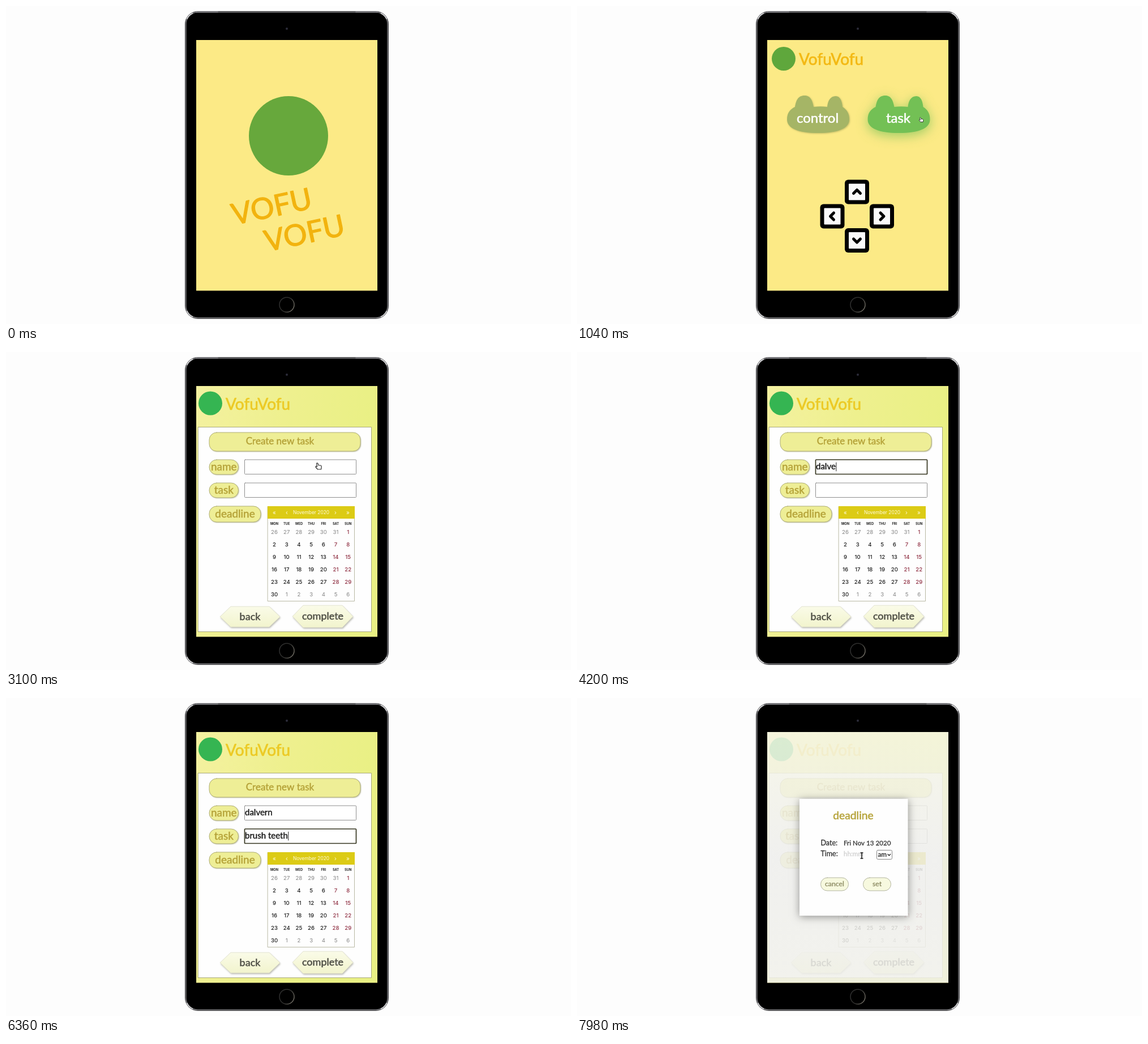
These frames come from a looping animation (998x561 px, 8 s). An HTML page with a canvas:

```html
<!DOCTYPE html>
<html lang="en">
<head>
<meta charset="utf-8">
<title>Task app on a tablet</title>
<style>
  html, body { margin: 0; width: 100%; height: 100%; overflow: hidden; background: #fdfdfd; }
  canvas { display: block; }
</style>
</head>
<body>
<canvas id="stage" width="998" height="561"></canvas>
<script>
const ctx = document.getElementById('stage').getContext('2d');
const LOOP = 8000;
const HAND = 'Lato, sans-serif';
const PLAIN = 'Inter, sans-serif';
const BRAND = 'Vofu';
const NAME = 'dalvern';
const TASK = 'brush teeth';

// Screen changes, in ms
const MAIN = 300, TASKS = 1660, FORM = 2560, DIALOG = 7440;
// Field focus and typing, in ms
const FOCUS_NAME = 3320, TYPE_NAME = 3480, FOCUS_TASK = 4940, TYPE_TASK = 5260, BLUR = 6640;

// Pointer path: time, x, y
const PATH = [
  [300, 512, 300], [460, 512, 300], [920, 608, 201], [1700, 608, 201],
  [2040, 446, 272], [2600, 446, 272], [3000, 552, 202], [4680, 552, 202],
  [4880, 540, 243], [6480, 540, 243], [6960, 562, 364], [7120, 562, 364],
  [7240, 582, 366], [7380, 562, 364], [7480, 562, 364], [7820, 503, 278]
];

const FROG_BUTTON = new Path2D(
  'M0 42C0 30 6 24 14 20C16 9 19 0 31 0C42 0 45 10 47 20C55 19 63 19 71 20' +
  'C72 10 76 1 86 1C94 1 97 10 98 20C106 25 110 32 110 42C110 58 90 66 55 66C20 66 0 58 0 42Z');
const POINTER = new Path2D(
  'M-3.5 -5.5Q-2.5 -7 -1.2 -5.5L0 -2.2L3.6 -2Q5.4 -1.6 5.2 0.6L4.6 5H-1.6L-5 1Q-5.4 -0.8 -3.6 -0.4L-2.4 0.2Z');

function text(str, x, y, size, color, { align = 'left', font = HAND, weight = 400 } = {}) {
  ctx.font = `${weight} ${size}px ${font}`;
  ctx.textAlign = align;
  ctx.fillStyle = color;
  ctx.fillText(str, x, y);
  if (font !== HAND) return;
  // A thin round outline gives the look of a felt pen
  ctx.lineJoin = 'round';
  ctx.lineWidth = size * 0.025;
  ctx.strokeStyle = color;
  ctx.strokeText(str, x, y);
}

const center = (str, x, y, size, color, opts) => text(str, x, y, size, color, { align: 'center', ...opts });

function paint(fill, stroke, width = 1) {
  if (fill) { ctx.fillStyle = fill; ctx.fill(); }
  if (stroke) { ctx.strokeStyle = stroke; ctx.lineWidth = width; ctx.stroke(); }
}

function box(x, y, w, h, r, fill, stroke, width) {
  ctx.beginPath();
  ctx.roundRect(x, y, w, h, r);
  paint(fill, stroke, width);
}

function disc(x, y, r, fill, stroke, width) {
  ctx.beginPath();
  ctx.arc(x, y, r, 0, Math.PI * 2);
  paint(fill, stroke, width);
}

function line(points, color, width) {
  ctx.beginPath();
  points.forEach(([x, y]) => ctx.lineTo(x, y));
  ctx.lineCap = ctx.lineJoin = 'round';
  paint(null, color, width);
}

function shadowed(color, blur, dx, dy, draw) {
  ctx.save();
  ctx.shadowColor = color;
  ctx.shadowBlur = blur;
  ctx.shadowOffsetX = dx;
  ctx.shadowOffsetY = dy;
  draw();
  ctx.restore();
}

function gradient(x0, y0, x1, y1, ...colors) {
  const g = ctx.createLinearGradient(x0, y0, x1, y1);
  colors.forEach((c, i) => g.addColorStop(i / (colors.length - 1), c));
  return g;
}

const vertical = (y0, y1, ...colors) => gradient(0, y0, 0, y1, ...colors);

function tablet() {
  box(316, 9, 360, 543, 23, '#3e3e40');
  box(317.8, 10.8, 356.4, 539.4, 21, '#0a0a0a', '#8e8e92', 1.2);
  box(320, 12.5, 352, 536, 19, '#000');
  // Light caught by the metal at the four corners
  [[338, 31, 1], [654, 31, 1.5], [654, 530, 0], [338, 530, 0.5]].forEach(([x, y, turn]) => {
    ctx.beginPath();
    ctx.arc(x, y, 20, (turn + 0.14) * Math.PI, (turn + 0.36) * Math.PI);
    paint(null, '#d6d6d8', 1.8);
  });
  line([[336, 10.5], [374, 10.5]], '#85858a', 2);
  line([[618, 10.5], [656, 10.5]], '#85858a', 2);
  disc(496, 40, 2, '#2c2c3a');
  disc(496, 527, 13, null, gradient(483, 520, 509, 534, '#303030', '#2e2e2c', '#77736a'), 1.5);
}

function splash() {
  disc(499, 229, 70, '#67a83c');
  [[469, 353], [527, 400]].forEach(([x, y]) => {
    ctx.save();
    ctx.translate(x, y);
    ctx.rotate(-0.21);
    center(BRAND.toUpperCase(), 0, 19, 52, '#f2b30f');
    ctx.restore();
  });
}

function header(x, y, green, gold) {
  disc(x, y, 21, green);
  text(BRAND + BRAND, x + 27, y + 11, 28, gold);
}

function frogButton(x, label, chosen, hover) {
  ctx.save();
  ctx.translate(x, 158);
  const draw = () => {
    ctx.fillStyle = chosen ? '#a5b566' : '#73c055';
    ctx.fill(FROG_BUTTON);
  };
  if (hover) shadowed('rgba(115,192,85,.7)', 20, 0, 5, draw);
  else shadowed('rgba(110,120,60,.4)', 3, 1, 1, draw);
  center(label, 54, 48, 24, '#fff');
  ctx.restore();
}

function arrowKey(x, y, angle) {
  ctx.save();
  ctx.translate(x, y);
  box(-21.5, -21.5, 43, 43, 6, '#000');
  box(-14.5, -14.5, 29, 29, 1, '#fafafa');
  ctx.rotate(angle);
  line([[-6, 2.5], [0, -3.5], [6, 2.5]], '#000', 5);
  ctx.restore();
}

function controlPage(hover) {
  header(365, 93, '#5fa73c', '#f3b914');
  frogButton(371, 'control', true);
  frogButton(513.5, 'task', false, hover);
  arrowKey(494.5, 328, 0);
  arrowKey(538.5, 371, Math.PI / 2);
  arrowKey(494.5, 413.5, Math.PI);
  arrowKey(451, 371, -Math.PI / 2);
}

function ovalButton(x, label, hover) {
  shadowed('rgba(90,80,30,.55)', 3, 1, 2, () => {
    ctx.beginPath();
    ctx.ellipse(x, 270, 32.5, 18.5, 0, 0, Math.PI * 2);
    paint(hover ? '#efe6c3' : '#faf5dc');
  });
  center(label, x, 275, 17, '#55503f');
}

function taskPage(hover) {
  header(365, 93, '#5fa73c', '#f3b914');
  frogButton(371, 'control', false);
  frogButton(513.5, 'task', true);
  ovalButton(439, 'create', hover);
  ovalButton(545.5, 'delete', false);
  box(353.5, 309.5, 283, 180.5, 8, '#fefefe', '#b3ad86');
}

function plate(x, y, w, h) {
  shadowed('rgba(100,100,40,.45)', 2, 1, 1, () => box(x, y, w, h, 13, '#eeee96'));
  box(x, y, w, h, 13, null, '#b0af78');
}

function label(str, x, y, w, h) {
  plate(x, y, w, h);
  center(str, x + w / 2, y + h / 2 + 5.5, 19, '#b5a238');
}

function field(y, value, focused) {
  box(421.5, y, 197, 25.5, 1, '#fff', focused ? '#34341f' : '#8f8f8f', focused ? 1.7 : 1);
  text(value, 422, y + 17, 15, '#161616');
  if (focused) {
    const x = 423 + ctx.measureText(value).width;
    line([[x, y + 5], [x, y + 20]], '#222', 1);
  }
}

function calendar(marked) {
  box(462.5, 272.5, 153, 167, 0, '#fefefe', '#b9b9a4');
  box(462, 272, 154, 22, 0, '#dccb15');
  const white = { font: PLAIN };
  center('November 2020', 539, 285.5, 8.4, '#fffce0', white);
  ['«', '‹', '›', '»'].forEach((c, i) => center(c, [474, 496, 582, 604][i], 287, 10, '#fffce0', white));
  ['MON', 'TUE', 'WED', 'THU', 'FRI', 'SAT', 'SUN'].forEach((d, i) =>
    center(d, 474 + 21.7 * i, 304.5, 5.7, '#222', { font: PLAIN, weight: 700 }));
  for (let i = 0; i < 42; i++) {
    const col = i % 7, x = 474 + 21.7 * col, y = 318 + 22 * Math.floor(i / 7);
    const day = i - 5, inMonth = day >= 1 && day <= 30;
    const num = day < 1 ? day + 31 : day > 30 ? day - 30 : day;
    if (inMonth && day === marked) box(x - 10.5, y - 11, 21.5, 22, 0, '#e3e3e3');
    const color = !inMonth ? '#858585' : col > 4 ? '#8f2f42' : '#1c1c1c';
    center(num, x, y + 3.3, 9.6, color, { font: PLAIN, weight: inMonth ? 500 : 400 });
  }
}

function hexButton(str, x, y, w, h) {
  const cut = 19;
  shadowed('rgba(80,80,60,.4)', 3, 1, 2, () => {
    ctx.beginPath();
    [[0, h / 2], [cut, 0], [w - cut, 0], [w, h / 2], [w - cut, h], [cut, h]]
      .forEach(([px, py]) => ctx.lineTo(x + px, y + py));
    ctx.closePath();
    paint(vertical(y, y + h, '#fafbe8', '#f2f4cd'));
  });
  paint(null, '#dcdcc8', 0.8);
  center(str, x + w / 2, y + h / 2 + 5.5, 18, '#4b4b43');
}

const typed = (str, start, step, t) => str.slice(0, Math.max(0, Math.floor((t - start) / step) + 1));

function formPage(t) {
  box(336, 60, 320, 442.5, 0, gradient(336, 60, 656, 140, '#f4f1a0', '#eef08e', '#e9f084'));
  header(361, 90.5, '#35b552', '#ecca25');
  box(339.5, 132.5, 306, 361, 0, '#fefefe', '#a9a97c');
  plate(359, 142, 267, 33);
  center('Create new task', 484, 162.5, 17, '#b5a238');
  label('name', 359, 190, 51.5, 26);
  label('task', 359, 231, 51.5, 26);
  label('deadline', 359, 272, 91, 28);
  field(190, typed(NAME, TYPE_NAME, 150, t), t >= FOCUS_NAME && t < FOCUS_TASK);
  field(231, typed(TASK, TYPE_TASK, 105, t), t >= FOCUS_TASK && t < BLUR);
  calendar(t >= 6920 ? 13 : 0);
  hexButton('back', 378, 449, 106, 36);
  hexButton('complete', 506, 447, 107, 39);
}

function pill(str, x, w) {
  box(x, 317, w, 23, 11.5, '#f7f9df', '#b3b5a0');
  center(str, x + w / 2, 332, 12.3, '#8b8a62');
}

function dialog() {
  box(336, 60, 320, 442.5, 0,
    vertical(60, 502, 'rgba(245,245,230,.86)', 'rgba(238,238,236,.86)', 'rgba(240,240,234,.86)'));
  shadowed('rgba(0,0,0,.4)', 14, 0, 2, () => box(393, 178, 191.5, 206, 0, '#fefefe'));
  center('deadline', 488, 214, 19.3, '#b5a238');
  text('Date:', 430.5, 260, 12.5, '#333');
  text('Fri Nov 13 2020', 471, 260, 11.6, '#333');
  text('Time:', 430.5, 279, 12.5, '#333');
  text('hh:mm', 471, 279, 11.6, '#cfcfcf');
  box(529.5, 268.5, 27, 16, 2, '#fff', '#858585');
  text('am', 531.5, 280, 11.8, '#222');
  line([[549, 275.5], [551.3, 278], [553.6, 275.5]], '#222', 1.3);
  pill('cancel', 430.5, 49);
  pill('set', 505.5, 49);
}

function pointerAt(t) {
  const i = PATH.findIndex(p => p[0] > t);
  if (i < 0) return PATH[PATH.length - 1].slice(1);
  const [t0, x0, y0] = PATH[Math.max(0, i - 1)], [t1, x1, y1] = PATH[i];
  const k = Math.max(0, (t - t0) / (t1 - t0)), e = k * k * (3 - 2 * k);
  return [x0 + (x1 - x0) * e, y0 + (y1 - y0) * e];
}

function pointer(t) {
  const typing = (t >= TYPE_NAME && t < 4660) || (t >= TYPE_TASK - 100 && t < 6460);
  if (t < MAIN || typing) return;
  const [x, y] = pointerAt(t);
  ctx.save();
  ctx.translate(x, y);
  if (t > 7700) {
    line([[-2, -5], [2, -5]], '#222', 1.4);
    line([[0, -5], [0, 5]], '#222', 1.6);
    line([[-2, 5], [2, 5]], '#222', 1.4);
  } else {
    const s = t < FORM ? 0.72 : 1;
    ctx.scale(s, s);
    ctx.fillStyle = '#fff';
    ctx.fill(POINTER);
    ctx.strokeStyle = '#2a2a2a';
    ctx.lineWidth = 1.2;
    ctx.stroke(POINTER);
  }
  ctx.restore();
}

function draw(t) {
  ctx.fillStyle = '#fdfdfd';
  ctx.fillRect(0, 0, 998, 561);
  tablet();
  ctx.save();
  ctx.beginPath();
  ctx.rect(336, 60, 320, 442.5);
  ctx.clip();
  box(336, 60, 320, 442.5, 0, '#fcea86');
  if (t < MAIN) splash();
  else if (t < TASKS) controlPage(t > 800);
  else if (t < FORM) taskPage(t > 1960);
  else formPage(t);
  if (t >= DIALOG) dialog();
  pointer(t);
  ctx.restore();
}

function tick() {
  draw(performance.now() % LOOP);
  requestAnimationFrame(tick);
}
tick();
</script>
</body>
</html>
```
